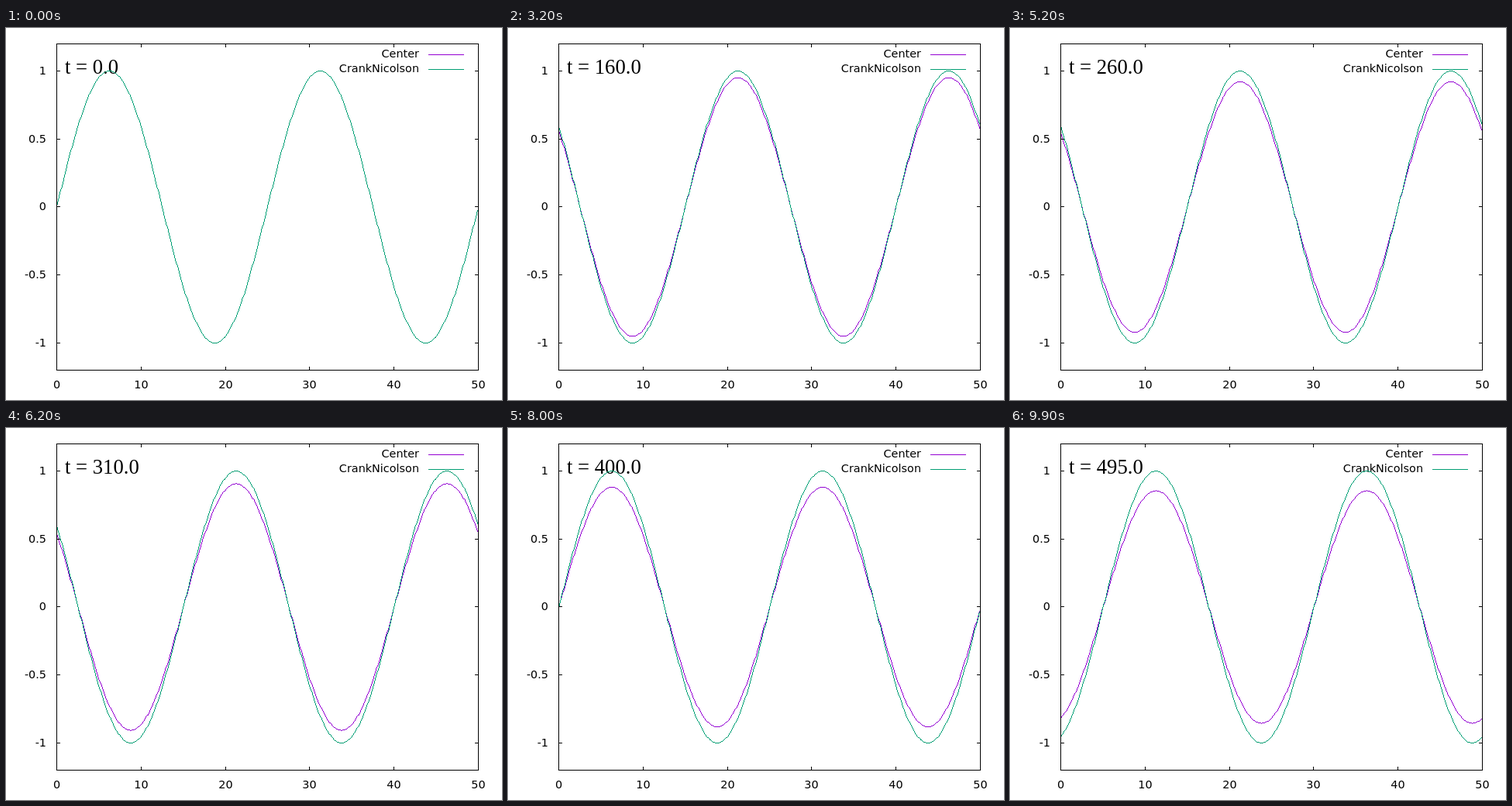
An HTML page with a canvas for the animation above (10 s loop, 640x480 px).

```html
<!DOCTYPE html>
<html lang="en">
<head>
<meta charset="utf-8">
<title>Advected sine wave</title>
<style>
  html, body { margin: 0; width: 100%; height: 100%; overflow: hidden; background: #fff; }
  canvas { display: block; width: 640px; height: 480px; }
</style>
</head>
<body>
<canvas id="plot" width="640" height="480"></canvas>
<script>
const ctx = document.getElementById('plot').getContext('2d');

const LEFT = 65, RIGHT = 609, TOP = 20, BOTTOM = 441, TICK = 5;
const PURPLE = '#9400d3', GREEN = '#009e73';
const SANS = '14.4px "DejaVu Sans", sans-serif';
const SERIF = '26.67px "Liberation Serif", serif';

const STEP_MS = 100, STEPS = 100, DT = 5;
const DX = 0.1, POINTS = 500, K = 2 * Math.PI / 25;
const SPEED = Math.sin(K * DX) / (K * DX);   // speed on the grid
const DECAY = 0.005 * K * K;                 // damping of the first scheme

const px = x => LEFT + Math.floor((RIGHT - LEFT) * x / 50 + 0.5);
const py = y => BOTTOM - Math.floor((BOTTOM - TOP) * (y + 1.2) / 2.4 + 0.5);

function text(str, x, y, align, font = SANS) {
  ctx.font = font;
  ctx.textAlign = align;
  ctx.fillStyle = '#000';
  ctx.fillText(str, x, y);
}

// Crisp one-pixel line, walked along its longer side
function line(x0, y0, x1, y1) {
  const steep = Math.abs(y1 - y0) > Math.abs(x1 - x0);
  if (steep) [x0, y0, x1, y1] = [y0, x0, y1, x1];
  if (x0 > x1) [x0, y0, x1, y1] = [x1, y1, x0, y0];
  const dx = x1 - x0, dy = Math.abs(y1 - y0), dir = Math.sign(y1 - y0);
  let d = 2 * dy - dx, b = y0;
  for (let a = x0; a <= x1; a++) {
    if (steep) ctx.fillRect(b, a, 1, 1);
    else ctx.fillRect(a, b, 1, 1);
    if (d >= 0) {
      b += dir;
      d -= 2 * dx;
    }
    d += 2 * dy;
  }
}

function curve(amp, t) {
  let x0, y0;
  for (let i = 0; i < POINTS; i++) {
    const x = i * DX;
    const x1 = px(x), y1 = py(amp * Math.sin(K * (x + SPEED * t)));
    if (i) line(x0, y0, x1, y1);
    x0 = x1;
    y0 = y1;
  }
}

function series(name, row, color, amp, t) {
  text(name, 533, row + 4, 'right');
  ctx.fillStyle = color;
  ctx.fillRect(545, row, 46, 1);
  curve(amp, t);
}

function axes() {
  ctx.fillStyle = '#000';
  for (const y of [TOP, BOTTOM]) ctx.fillRect(LEFT, y, RIGHT - LEFT + 1, 1);
  for (const x of [LEFT, RIGHT]) ctx.fillRect(x, TOP, 1, BOTTOM - TOP + 1);
  for (let v = 0; v <= 50; v += 10) {
    const x = px(v);
    ctx.fillRect(x, TOP, 1, TICK);
    ctx.fillRect(x, BOTTOM - TICK + 1, 1, TICK);
    text(v, x + 0.5, 465, 'center');
  }
  for (let v = -1; v <= 1; v += 0.5) {
    const y = py(v);
    ctx.fillRect(LEFT, y, TICK, 1);
    ctx.fillRect(RIGHT - TICK + 1, y, TICK, 1);
    text(v, 52, y + 5, 'right');
  }
}

function draw(ms) {
  const t = Math.floor(ms / STEP_MS) % STEPS * DT;
  ctx.fillStyle = '#fff';
  ctx.fillRect(0, 0, 640, 480);
  text('t = ' + t.toFixed(1), 76, 59, 'left', SERIF);
  series('Center', 34, PURPLE, Math.exp(-DECAY * t), t);
  series('CrankNicolson', 53, GREEN, 1, t);
  axes();
}

const start = performance.now();
function tick() {
  draw(performance.now() - start);
  requestAnimationFrame(tick);
}
tick();
</script>
</body>
</html>
```
